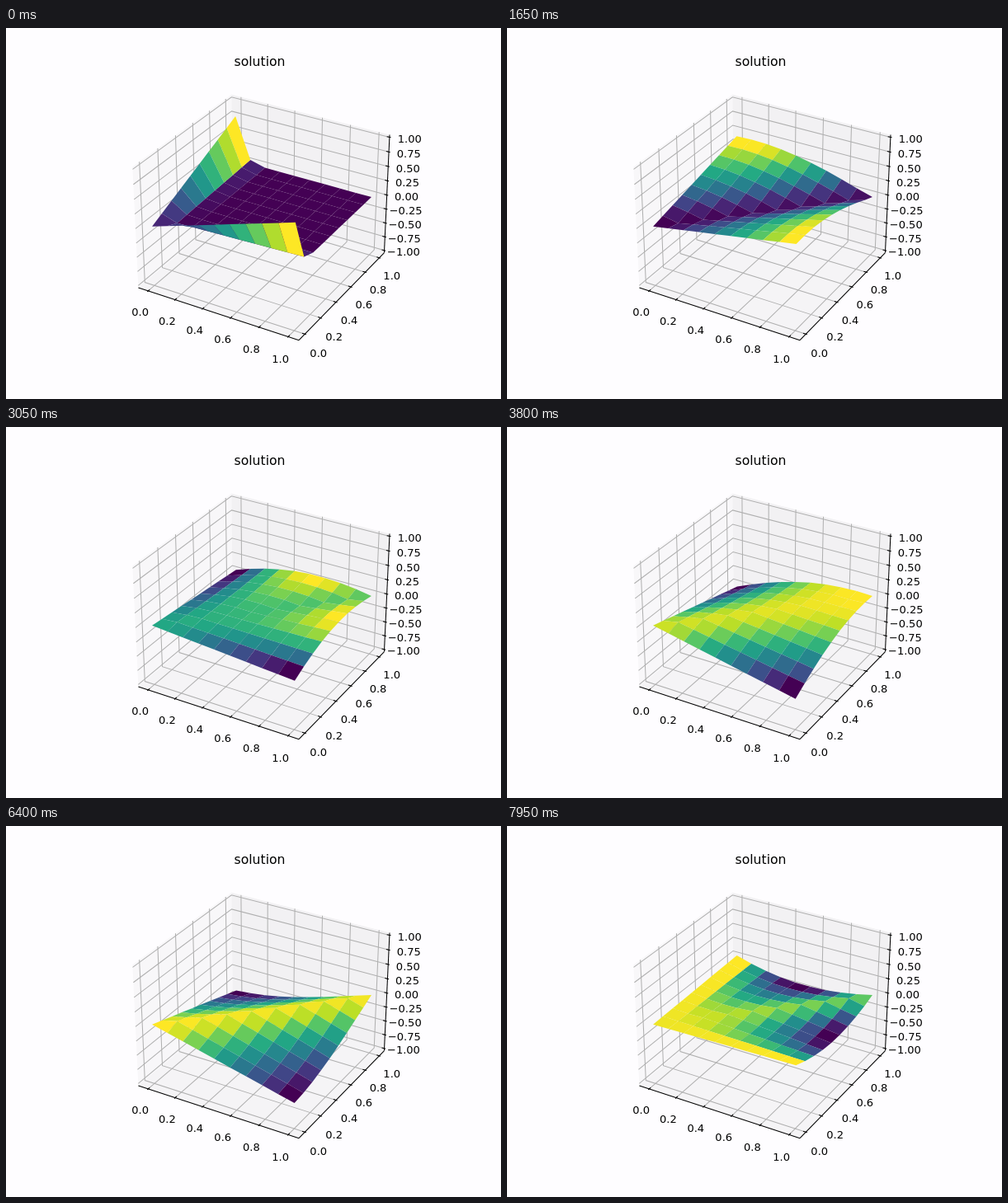
These frames come from a looping animation (600 by 450 pixels, 8 s). An HTML page with a canvas:

```html
<!DOCTYPE html>
<html lang="en">
<head>
<meta charset="utf-8">
<title>solution</title>
<style>
  html, body { margin: 0; height: 100%; overflow: hidden; background: #fefdff; }
  canvas { display: block; }
</style>
</head>
<body>
<canvas id="plot" width="600" height="450"></canvas>
<script>
const ctx = document.getElementById('plot').getContext('2d');

const STEP_MS = 50, STEPS = 160;
const CELLS = 9;
const AMPLITUDE = 0.78;
const PHASE_PER_STEP = 0.03;
const LAG_PER_CELL = 0.105;

const VIRIDIS = ['440154', '482475', '414487', '355f8d', '2a788e', '21918c',
  '22a884', '44bf70', '7ad151', 'bddf26', 'fde725']
  .map(hex => [0, 2, 4].map(k => parseInt(hex.slice(k, k + 2), 16)));

function viridis(v) {
  const pos = v * (VIRIDIS.length - 1);
  const k = Math.min(Math.floor(pos), VIRIDIS.length - 2);
  const rgb = VIRIDIS[k].map((c, n) => Math.round(c + (VIRIDIS[k + 1][n] - c) * (pos - k)));
  return `rgb(${rgb})`;
}

// Perspective camera: elevation 30°, azimuth -60°, distance 10.
const COS_E = Math.cos(Math.PI / 6), SIN_E = 0.5;
const COS_A = 0.5, SIN_A = -Math.sin(Math.PI / 3);

function project([x, y, z]) {
  const bx = (x - 0.5) * 1.03896, by = (y - 0.5) * 1.03896, bz = z * 0.42857;
  const along = bx * COS_A + by * SIN_A;
  const right = by * COS_A - bx * SIN_A;
  const up = bz * COS_E - along * SIN_E;
  const depth = 10 - along * COS_E - bz * SIN_E;
  return { x: 312.2 + 1873 * right / depth, y: 222.6 - 1873 * up / depth, depth };
}

function trace(points) {
  ctx.beginPath();
  points.forEach(p => ctx.lineTo(p.x, p.y));
}

function line(color, ...points) {
  trace(points.map(project));
  ctx.strokeStyle = color;
  ctx.lineWidth = 1.04;
  ctx.stroke();
}

function pane(color, ...points) {
  trace(points.map(project));
  ctx.closePath();
  ctx.fillStyle = color;
  ctx.fill();
}

function label(text, point) {
  const p = project(point);
  ctx.fillText(text, p.x, p.y + 10);
}

const LO = -0.0729, HI = 1.0729, FLOOR = -1.0417, TOP = 1.0417;
const TICK_OUT = 0.0092, TICK_IN = 0.0183;
const PAD = 0.0934, PAD_Z = 0.17;
const GRID = '#b0b0b0', INK = '#000';
const UNIT_TICKS = [0, 0.2, 0.4, 0.6, 0.8, 1];
const Z_TICKS = Array.from({ length: 9 }, (_, k) => -1 + k / 4);

function drawAxes() {
  ctx.fillStyle = '#fefdff';
  ctx.fillRect(0, 0, 600, 450);

  pane('#f8f7f9', [LO, LO, FLOOR], [LO, HI, FLOOR], [LO, HI, TOP], [LO, LO, TOP]);
  pane('#f2f1f3', [LO, HI, FLOOR], [HI, HI, FLOOR], [HI, HI, TOP], [LO, HI, TOP]);
  pane('#f5f4f6', [LO, LO, FLOOR], [HI, LO, FLOOR], [HI, HI, FLOOR], [LO, HI, FLOOR]);

  for (const v of UNIT_TICKS) {
    line(GRID, [v, LO, FLOOR], [v, HI, FLOOR], [v, HI, TOP]);
    line(GRID, [HI, v, FLOOR], [LO, v, FLOOR], [LO, v, TOP]);
  }
  for (const z of Z_TICKS) line(GRID, [LO, LO, z], [LO, HI, z], [HI, HI, z]);

  line(INK, [LO, LO, FLOOR], [HI, LO, FLOOR]);
  line(INK, [HI, LO, FLOOR], [HI, HI, FLOOR]);
  line(INK, [HI, HI, FLOOR], [HI, HI, TOP]);

  ctx.textAlign = 'center';
  ctx.font = '13.02px "DejaVu Sans", sans-serif';
  for (const v of UNIT_TICKS) {
    line(INK, [v, LO - TICK_OUT, FLOOR], [v, LO + TICK_IN, FLOOR]);
    line(INK, [HI + TICK_OUT, v, FLOOR], [HI - TICK_IN, v, FLOOR]);
    ctx.fillStyle = INK;
    label(v.toFixed(1), [v, LO - PAD, FLOOR - PAD_Z]);
    label(v.toFixed(1), [HI + PAD, v, FLOOR - PAD_Z]);
  }
  for (const z of Z_TICKS) {
    line(INK, [HI + TICK_OUT, HI, z], [HI - TICK_IN, HI, z]);
    ctx.fillStyle = INK;
    label(z.toFixed(2).replace('-', '\u2212'), [HI + PAD, HI + PAD, z]);
  }
  ctx.font = '15.63px "DejaVu Sans", sans-serif';
  ctx.fillText('solution', 307.5, 46.2);
}

// Oscillating edges x=0 and y=0 are carried diagonally inward behind a softening front.
function height(i, j, step) {
  const inward = Math.min(i, j);
  const front = 0.5 + 0.29 * step;
  const spread = Math.sqrt(0.16 + 0.05 * step);
  const arrived = inward ? 1 / (1 + Math.exp(1.7 * (inward - front) / spread)) : 1;
  const phase = PHASE_PER_STEP * step - LAG_PER_CELL * inward;
  return AMPLITUDE * Math.abs(i - j) / CELLS * Math.cos(phase) * arrived;
}

function drawSurface(step) {
  const quads = [];
  for (let i = 0; i < CELLS; i++) {
    for (let j = 0; j < CELLS; j++) {
      const corners = [[i, j], [i + 1, j], [i + 1, j + 1], [i, j + 1]]
        .map(([a, b]) => [a / CELLS, b / CELLS, height(a, b, step)]);
      const points = corners.map(project);
      quads.push({
        points,
        level: corners.reduce((sum, c) => sum + c[2], 0) / 4,
        depth: points.reduce((sum, p) => sum + p.depth, 0)
      });
    }
  }
  const levels = quads.map(q => q.level);
  const low = Math.min(...levels), range = Math.max(...levels) - low;
  quads.sort((a, b) => b.depth - a.depth);
  for (const quad of quads) {
    trace(quad.points);
    ctx.closePath();
    ctx.fillStyle = viridis((quad.level - low) / range);
    ctx.fill();
  }
}

const start = performance.now();
function frame() {
  const elapsed = Math.max(0, performance.now() - start);
  drawAxes();
  drawSurface(Math.floor(elapsed / STEP_MS) % STEPS);
  requestAnimationFrame(frame);
}
frame();
</script>
</body>
</html>
```
